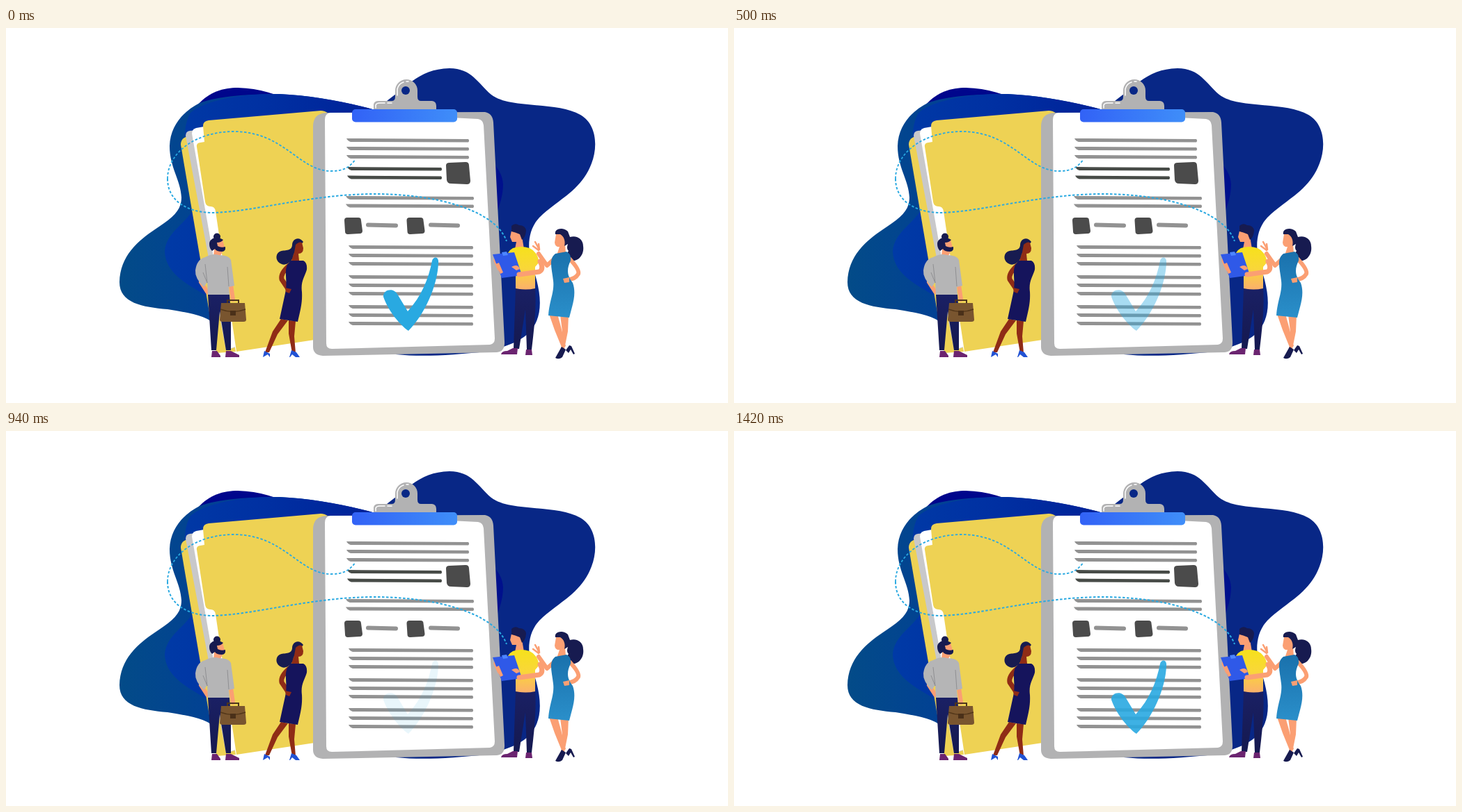
These frames come from a looping animation (1037x540 px, 1480 ms). An HTML page:

```html
<!DOCTYPE html>
<html lang="en">
<head>
<meta charset="utf-8">
<title>Checklist</title>
<style>
  html, body { margin: 0; height: 100%; overflow: hidden; background: #fff; }
  svg { display: block; width: 100vw; height: 100vh; }
  .navy { fill: #171b50; }
  .skin { fill: #fb9f73; }
  .deep { fill: #8f2c16; }
  .shoe { fill: #6b2470; }
  .limb { fill: none; stroke: #fb9f73; stroke-linecap: round; stroke-linejoin: round; }
  .trail { fill: none; stroke: #29a9e1; stroke-dasharray: 3.5 2.5; }
  .check { fill: #29a9e1; animation: fade 1480ms infinite; }
  @keyframes fade {
    0% { opacity: 1; animation-timing-function: step-end; }
    13.5135% { opacity: .9; animation-timing-function: steps(9); }
    50% { opacity: 0; animation-timing-function: step-end; }
    63.5135% { opacity: .1; animation-timing-function: steps(9); }
    100% { opacity: 1; }
  }
</style>
</head>
<body>
<svg viewBox="0 0 1037 540">
  <defs>
    <linearGradient id="sea"><stop stop-color="#034b88"/><stop offset=".5" stop-color="#013d98"/><stop offset="1" stop-color="#002f9e"/></linearGradient>
    <linearGradient id="royal"><stop stop-color="#003aa6"/><stop offset=".3" stop-color="#0030a2"/><stop offset="1" stop-color="#00108c"/></linearGradient>
    <linearGradient id="bar"><stop stop-color="#3262f6"/><stop offset="1" stop-color="#3f8ef9"/></linearGradient>
    <linearGradient id="shirt" x2="0" y2="1"><stop stop-color="#f6e11c"/><stop offset=".5" stop-color="#f9d738"/><stop offset="1" stop-color="#fbb06c"/></linearGradient>
    <linearGradient id="dress" x2="0" y2="1"><stop stop-color="#1a71ac"/><stop offset="1" stop-color="#2a8fca"/></linearGradient>
    <linearGradient id="pants" x2="0" y2="1"><stop stop-color="#1a2064"/><stop offset="1" stop-color="#151950"/></linearGradient>
  </defs>

  <g id="backdrop">
    <path fill="#00068c" d="M276 110C292 92 312 86 333 86C365 87 390 95 408 107L400 150H290Z"/>
    <path fill="url(#sea)" d="M278 108C305 98 350 95 392 95C440 97 490 107 530 118V430H304C290 414 262 410 232 405C196 402 163 396 163 366C164 328 189 307 214 290C238 274 252 264 252 244C251 219 235 201 235 170C236 140 255 120 278 108Z"/>
    <path fill="#082786" d="M530 117C575 88 590 59 637 58C669 58 678 80 697 96C724 117 790 105 825 125C849 139 850 172 841 195C826 235 792 247 766 273C745 296 750 328 759 352C770 387 770 415 755 434C744 450 718 459 690 466C640 471 600 474 560 470Z"/>
    <path fill="url(#royal)" d="M265 122C285 104 340 94 392 95C440 97 490 107 530 118C620 140 714 180 714 225C714 260 690 300 640 395H300C278 375 230 362 228 322C230 287 275 277 274 240C270 205 244 160 265 122Z"/>
  </g>

  <g id="folder">
    <path fill="#eed254" d="M251 168Q251 160 258 157L272 154L330 466L302 468Z"/>
    <path fill="#c8c8ca" d="M258 155Q258 149 264 148L273 147L329 460L316 464Z"/>
    <path fill="#fff" d="M267 152Q267 146 273 144L290 141L332 458L321 462Z"/>
    <path fill="#eed254" d="M283 141Q283 134 291 133L452 119Q458 119 463 123V446L331 466L301 264Q300 257 294 257Q287 257 286 250L274 171Q273 166 279 165L285 164Z"/>
  </g>

  <g id="board">
    <path fill="#b2b2b3" d="M441 142Q441 123 460 122L688 121Q699 123 700 136L716 451Q717 466 705 467L455 472Q441 471 441 459Z"/>
    <path fill="#fff" d="M458 132Q458 123 466 122H500L678 131Q685 132 686 140L702 447Q702 455 695 456L468 462Q460 462 460 454Z"/>
    <path fill="#b2b2b3" d="M528 118V110Q529 105 535 105H554Q559 105 559 99V90A16 16 0 0 1 591 90V99Q591 105 596 105H612Q618 106 618 112V118Z"/>
    <path class="limb" style="stroke: #fff" stroke-width="1.5" d="M531 115V111Q532 108 537 108H544M548 108H554M562 97V88Q564 80 571 78M575 77H578"/>
    <circle cx="574" cy="90" r="6" fill="#082786"/>
    <rect x="497" y="117" width="151" height="18.5" rx="5" fill="url(#bar)"/>
    <g id="lines"></g>
    <path class="limb" style="stroke: #929292" stroke-width="6" d="M520 283.5L560 284.5M610 283.500L649 284.5"/>
    <g fill="#4b4b4b">
      <path d="M632 198Q632 194 637 194L660 193Q665 193 665 198L667 220Q667 225 662 225L639 224Q634 224 633 219Z"/>
      <path id="box" d="M486 277Q486 273 490 273H506Q510 273 510 277L512 292Q512 296 508 296L491 297Q487 297 487 293Z"/>
      <use href="#box" x="89.5"/>
    </g>
    <path class="check" d="M542 387C541 377 556 373 562 383L577 408C597 386 607 361 612 335C614 328 622 329 621 338C620 371 601 413 578 436C565 427 549 407 542 387Z"/>
  </g>

  <path class="trail" stroke-width="2" d="M232 217C232 250 262 266 298 266C360 264 440 239 530 239C612 239 702 260 719 307"/>
  <path class="trail" stroke-width="1.8" d="M232 217C232 180 272 149 328 149C400 150 420 205 466 206C482 206 492 203 502 189"/>

  <g id="bearded-man">
    <path class="skin" d="M296 308L311 305L314 316L308 328L298 329L299 319Z"/>
    <circle class="navy" cx="303" cy="300.5" r="5"/>
    <path class="navy" d="M292 311C292 302 304 299 312 305Q309 309 303 309L304 314Q309 317 315 315Q316 322 310 322Q302 322 300 318L296 321Q292 317 292 311Z"/>
    <path class="limb" stroke-width="6" d="M280 366L289 380M323 370L326 391"/>
    <path fill="#b5b5b6" d="M286 330Q297 324 306 327Q320 327 323 334L328 371L320 373L321 384H290L289 366L284 373Q271 360 272 349Q274 333 286 330Z"/>
    <path fill="none" stroke="#8f8f92" d="M286 340L289 367L283 352M318 344L320 372"/>
    <path fill="url(#pants)" d="M290 384H321L323 410V464H316L307 408L302 464H295Z"/>
    <path class="shoe" d="M296 465H303L308 472V474H295ZM316 465H323L335 471V474H315Z"/>
    <path fill="none" stroke="#4f351d" stroke-width="2" d="M318 397V392H334V397"/>
    <path fill="#79552f" d="M309 396H343L345 420Q345 423 341 423H311Q307 423 307 420Z"/>
    <path fill="none" stroke="#533719" stroke-width="1.5" d="M308 405Q326 412 344 405"/>
    <path fill="#4a3019" d="M322 407H330V414H322Z"/>
  </g>

  <g id="dark-haired-woman">
    <path class="navy" d="M411 313C411 302 422 300 427 308L422 314L413 326C413 335 403 343 396 340C387 337 386 326 393 322C400 319 410 322 411 313Z"/>
    <path class="deep" d="M416 312Q421 307 425 309L427 317Q427 325 420 325L421 335H410L414 323Z"/>
    <path class="limb" style="stroke: #8f2c16" stroke-width="7" d="M407 342Q394 353 396 362L406 377"/>
    <path class="deep" d="M395 419L405 421L390 441L378 467H372L383 437ZM406 421L416 422L414 444L416 468H411L406 440Z"/>
    <path fill="#15145c" d="M409 335H427Q433 338 432 348C429 358 423 365 425 380C426 397 422 409 419 423L393 419L401 382C405 364 399 352 404 341Z"/>
    <path class="deep" d="M401 374L410 376L407 382L402 380Z"/>
    <path fill="#2152d4" d="M371 465L379 469V474L376 470L369 474ZM410 464L417 467L422 474H416L411 470L408 474H407Z"/>
  </g>

  <g id="yellow-shirt-man">
    <path class="skin" d="M726 292L741 292L742 306L744 318H731L733 308L727 308L724 301Z"/>
    <path class="navy" d="M726 285Q731 280 737 284Q746 284 747 292Q746 302 741 305L738 297Q731 294 726 293Z"/>
    <path fill="url(#pants)" d="M732 374H760C762 400 759 430 755 463H748L746 405L737 462H729Z"/>
    <path class="shoe" d="M728 461H735L734 470H711Q712 465 720 465ZM747 463H755L756 471H746Z"/>
    <path class="limb" stroke-width="7" d="M704 335L709 346L716 352"/>
    <path fill="url(#shirt)" d="M728 317Q740 313 752 317Q763 322 766 337L760 344V375Q746 378 732 375V342L718 337Q718 322 728 317Z"/>
    <path fill="#2f59e8" d="M699 326L730 323L741 356L712 360Z"/>
    <path fill="#4d86ff" d="M712 323L719 322L721 327L714 328Z"/>
    <path class="limb" stroke-width="7" d="M767 336Q773 347 766 351L737 355"/>
    <path class="skin" d="M726 344Q735 339 738 347L733 349ZM703 340L708 338L714 352L710 354Z"/>
  </g>

  <g id="blue-dress-woman">
    <path class="skin" d="M790 297L799 294Q806 301 803 312L804 324L791 327L795 315Q789 316 788 309Z"/>
    <path class="navy" d="M789 297C787 289 800 286 807 293L810 301C820 298 829 304 829 314C831 327 821 337 812 335C805 333 804 325 808 321C805 318 806 314 807 311L802 314C804 306 801 300 796 297Z"/>
    <path class="limb" stroke-width="6" d="M789 331L777 342L765 325M810 333Q824 348 822 354Q817 363 804 362"/>
    <path class="limb" stroke-width="2.5" d="M765 320L757 314M766 319L760 308M766 319L765 311"/>
    <path class="skin" d="M780 412H792L797 430L804 458L799 462L788 435ZM796 413H808L807 437L802 462L797 466L799 437Z"/>
    <path fill="url(#dress)" d="M789 325L805 322Q812 325 811 335C804 349 807 358 814 367C820 384 813 400 809 417L779 414C780 394 788 380 786 364C784 346 779 333 789 325Z"/>
    <path class="skin" d="M800 361L809 359V366L802 367Z"/>
    <path class="navy" d="M798 459L804 463L799 474Q794 478 789 475ZM809 457L812 458L817 469L815 470L811 463L808 468L804 464Z"/>
  </g>
</svg>
<script>
  const lines = document.getElementById('lines');

  // Ruled text line with a slanted left end and a slight tilt.
  function rule(x1, x2, y, fill = '#929292') {
    const p = document.createElementNS('http://www.w3.org/2000/svg', 'path');
    p.setAttribute('fill', fill);
    p.setAttribute('d', `M${x1} ${y - 3}L${x2 - 1} ${y - 2}Q${x2 + 1} ${y} ${x2 - 1} ${y + 2.5}L${x1 + 6} ${y + 2}Q${x1 + 2} ${y + 1} ${x1} ${y - 3}Z`);
    lines.append(p);
  }

  for (const y of [162, 174, 186]) rule(489, 665, y);
  for (const y of [203, 215.5]) rule(490, 626, y, '#474b47');
  for (const y of [245, 256.5]) rule(488, 672, y);
  for (const top of [316, 359, 402])
    for (let i = 0; i < 3; i++) rule(492, 671, top + i * 12);
</script>
</body>
</html>
```
